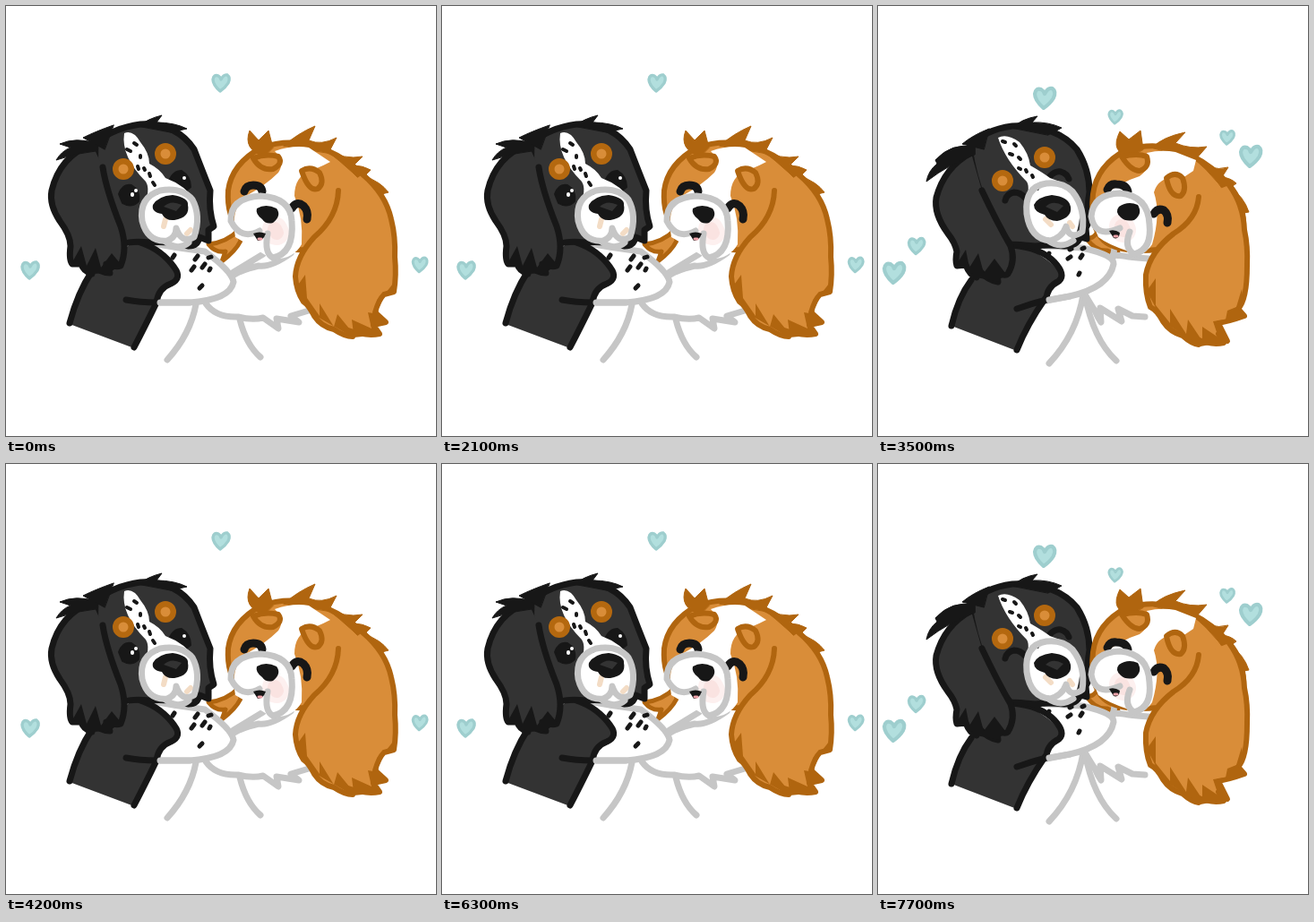
Recreate the animation shown at these times as an HTML page. Size 480x480 px, loop 8.4 s.

```html
<!DOCTYPE html>
<html lang="en">
<head>
<meta charset="utf-8">
<title>Cuddling spaniels</title>
<style>
html, body { margin: 0; width: 100%; height: 100%; overflow: hidden; background: #fff; }
svg { display: block; width: 100vw; height: 100vh; }
path { stroke-linecap: round; stroke-linejoin: round; }
</style>
</head>
<body>
<svg id="stage" viewBox="0 0 480 480"></svg>
<script>
const INK = '#171717', COAT = '#333', GREY = '#c6c6c6', GOLD = '#d98d39', RUST = '#b0650f', WHITE = '#fff', NONE = 'none';
const STEP = 700;

// Each part: fill, stroke, width, leaning-out path, hugging path, and optionally which poses use it.
const parts = [
  // far ear, legs and chest
  [GOLD, RUST, 5, 'M226 266Q246 264 260 250L262 262Q256 274 241 285L245 274Q234 276 226 266Z',
    'M232 258Q240 262 246 250L266 262Q268 274 268 279L256 273Q242 274 232 258Z'],
  [NONE, GREY, 7, 'M212 333Q206 366 180 395', 'M229 322Q222 366 191 399'],
  [NONE, GREY, 7, 'M261 350Q268 378 284 392', 'M231 322Q240 372 266 396'],
  [NONE, GREY, 7, 'M223 332Q234 348 259 347Q275 351 287 348L304 360L302 349L327 353L318 346L338 340',
    'M231 322Q238 334 242 340Q245 347 249 353L248 337L272 352L268 338L284 346L298 347'],

  // black dog: arm and body
  [WHITE, GREY, 7, 'M158 264Q190 270 222 274Q252 296 254 308Q250 328 205 331L172 331',
    'M152 266Q190 268 228 270Q264 278 263 288Q258 314 214 324L188 329'],
  [NONE, GREY, 7, 'M318 276Q296 292 282 290Q258 296 252 302M287 277L254 297',
    'M302 282Q288 281 280 280Q268 278 262 278M264 270L262 282'],
  [COAT, NONE, 0, 'M96 296Q82 316 71 355L143 382Q154 362 167 335L172 318Q190 312 193 302Q184 280 150 258Z',
    'M104 306Q90 326 82 357L155 385Q166 364 181 336L190 320Q206 308 203 298Q190 278 146 262Z'],
  [NONE, INK, 7, 'M96 296Q80 320 71 354M143 381Q160 348 168 331',
    'M104 306Q89 326 82 357M155 384Q166 356 187 326'],
  [NONE, INK, 7, 'M150 264Q174 272 188 292Q197 304 184 310Q170 315 168 331Q150 331 134 328',
    'M150 267Q182 270 197 286Q210 300 202 307Q188 314 188 328Q172 332 155 338'],
  [NONE, GREY, 7, 'M172 331L205 331', 'M191 328L214 324'],
  [NONE, INK, 5, 'M186 281l2-3M211 283l3-4M226 281l3-1M207 295l3-4M219 292l3-4M227 295l1-2M216 315l3-3',
    'M190 279l1-3M212 282l3-2M214 272l2-1M205 262l2-1M226 281l2-3M228 271l2-1M224 300l1-2'],

  // black dog: head
  [COAT, INK, 7, 'M100 153Q120 136 150 132Q190 130 210 160Q220 186 228 206Q226 228 232 246L226 250L226 262L216 258Q214 268 204 268Q180 262 160 264Q140 262 130 266Q96 222 100 153Z',
    'M102 158Q118 138 150 134Q198 132 222 160Q236 182 236 208Q233 224 235 242L232 248L233 260L226 258Q222 268 208 268Q190 266 176 268Q156 266 148 266Q112 226 102 158Z'],
  [COAT, INK, 7, 'M96 154Q60 168 51 206Q48 222 60 240Q72 256 72 268Q70 284 74 288L84 288Q86 296 96 299L98 290Q106 298 116 298L112 288Q122 292 128 290Q136 270 128 246Q112 206 108 180',
    'M104 164Q74 180 65 214Q62 232 78 254Q86 264 88 274Q86 284 88 290L98 289Q102 300 110 303L113 295Q122 306 134 308L133 298Q142 302 145 299Q154 284 148 268Q132 240 116 206'],
  [INK, NONE, 0, 'M74 286L84 268L90 290L100 270L106 292L118 276L128 288L116 298L96 299L84 290Z',
    'M88 288L98 272L102 292L112 276L118 298L130 282L142 298L134 308L110 303L98 293Z'],
  [INK, INK, 1, 'M110 160L86 147Q100 140 120 133ZM100 162Q78 164 56 172Q62 162 72 158L60 154Q78 146 100 153ZM148 134Q158 126 174 122L168 130Q188 130 202 137L184 141Z',
    'M118 160L94 154Q106 144 124 137ZM108 166Q80 176 54 196Q56 184 66 176L64 172Q82 152 108 157ZM150 136Q160 126 178 123L172 130Q190 129 205 136L190 144Z'],
  [INK, INK, 2, 'M126 210Q130 198 140 200Q150 206 148 218Q140 226 130 220ZM182 196Q186 184 196 184Q206 190 206 202Q198 210 188 206Z', '', 'out'],
  [NONE, WHITE, 4, 'M141 210l0 1M199 192l0 0M145 206l0 0', '', 'out'],
  [NONE, INK, 7, 'M132 214Q134 206 144 206Q150 207 156 212M184 195Q190 187 200 189Q206 192 208 197',
    'M142 217Q144 209 152 208Q159 208 164 214M192 190Q198 184 204 185Q211 187 213 193', 'hug'],
  [WHITE, NONE, 0, 'M132 142Q142 138 150 152Q160 164 160 176Q172 182 178 192Q200 200 212 218Q220 240 206 262Q182 272 162 258Q148 240 153 222Q162 206 156 196Q128 168 132 142Z',
    'M134 147Q144 142 158 152Q168 164 170 178Q184 186 192 192Q212 198 222 212Q230 236 218 262Q196 270 178 260Q164 244 165 220Q170 202 166 196Q142 172 134 147Z'],
  [NONE, INK, 4, 'M135 160l4 2M143 153l3 2M150 167l0 2M147 179l1 3M154 181l1 2M160 187l1 3M164 197l2 3M167 208l1 1',
    'M139 151l3 1M152 154l2 2M147 165l3 1M157 169l2 2M157 181l2 1M165 183l1 2M172 189l1 2M177 203l1 1'],
  [NONE, '#b4680f', 24, 'M131 182l0 0M178 165l0 0', 'M139 195l0 0M186 169l0 0'],
  [NONE, GOLD, 11, 'M131 182l0 0M178 165l0 0', 'M139 195l0 0M186 169l0 0'],
  [NONE, '#f3dcc5', 6, 'M178 238l-2 8M206 250l-4 4', 'M187 238l6 6M217 246l-3-4'],
  [WHITE, GREY, 7, 'M178 263Q192 274 204 264', 'M190 262Q204 272 218 262'],
  [NONE, GREY, 7, 'M172 206Q148 214 152 240Q158 264 180 262Q190 258 190 248Q196 266 210 258Q218 234 208 216Q196 202 172 206',
    'M188 198Q163 202 166 232Q170 260 192 262Q206 258 210 246Q214 262 228 252Q232 226 217 207Q206 196 188 198'],
  [INK, NONE, 0, 'M164 222Q170 212 186 211Q204 214 203 222Q206 236 188 239Q178 240 174 232Q162 230 164 222Z',
    'M174 222Q178 213 194 211Q213 213 215 224Q217 236 200 240Q190 240 186 233Q174 230 174 222Z'],
  [COAT, NONE, 0, 'M176 224Q184 216 196 222L190 229Z', 'M187 224Q195 216 207 223L200 230Z'],

  // tan dog: head
  [GOLD, RUST, 6, 'M285 158Q320 146 356 160Q384 172 402 192Q424 210 426 240Q404 262 334 272Q296 274 262 250Q246 236 248 206Q252 176 285 158Z',
    'M278 160Q316 150 348 166Q376 180 392 200Q408 218 408 244Q388 262 312 272Q268 276 252 262Q236 246 240 210Q244 178 278 160Z'],
  [RUST, RUST, 1, 'M288 168Q264 160 272 139L282 150L293 139L298 158ZM310 156Q326 142 345 134L338 150Q352 156 369 147L360 164ZM356 160Q378 172 398 168L388 178Q398 178 407 183L400 190Q418 196 427 208L412 212Q390 186 356 160Z',
    'M282 168Q258 164 270 140L280 149L293 139L296 160ZM306 158Q318 146 343 141L332 153Q348 160 367 157L354 172ZM350 168Q370 186 391 180L384 191Q394 192 400 198L393 203Q408 212 414 230L402 232Q384 196 350 168Z'],
  [WHITE, NONE, 0, 'M300 162Q320 155 338 158L362 174L354 178L340 184Q322 190 322 212Q332 236 330 266Q320 284 296 282Q270 266 256 258Q250 226 268 212Q290 200 304 186Q312 174 300 162Z',
    'M300 164Q316 160 332 163L355 172L352 184L340 192Q314 188 308 208Q316 232 306 266Q298 280 280 274Q256 266 246 258Q234 232 248 214Q272 196 292 190Q308 178 300 164Z'],
  [GOLD, RUST, 6, 'M276 170Q290 164 304 168Q310 176 298 182Q284 184 276 170ZM330 184Q340 178 350 186Q356 198 348 204Q338 208 330 184Z',
    'M272 168Q290 164 300 168Q304 180 292 184Q282 184 272 168ZM322 192Q332 184 340 192Q345 206 338 212Q326 214 322 192Z'],
  [NONE, INK, 9, 'M266 207Q268 200 276 200Q285 200 286 207M319 226Q324 217 332 223Q338 229 336 238',
    'M256 205Q259 198 266 199Q277 199 279 207M308 232Q312 225 319 228Q325 233 323 242'],
  [NONE, '#fdf0ef', 28, 'M300 249l2 4', 'M272 246l2 4'],
  [NONE, '#fae3e1', 16, 'M300 249l2 4', 'M272 246l2 4'],
  [NONE, GREY, 7, 'M283 251Q262 262 251 240Q250 214 284 212Q318 214 319 240Q322 276 298 281Q288 276 292 254',
    'M270 248Q242 260 238 235Q240 210 270 209Q302 212 303 244Q306 272 286 277Q274 270 281 252'],
  [INK, NONE, 0, 'M276 254Q283 251 290 254Q287 262 281 262Z', 'M258 251Q264 249 270 253Q269 261 263 259Z'],
  [NONE, '#efa3aa', 3, 'M282 260l3 0', 'M264 257l3 0'],
  [INK, NONE, 0, 'M280 226Q290 220 302 226Q308 234 298 242Q290 244 286 238Q278 232 280 226Z',
    'M269 224Q279 217 290 222Q296 232 286 239Q276 241 271 236Q264 230 269 224Z'],

  // tan dog: near ear with darker locks
  [GOLD, RUST, 6, 'M371 206Q370 236 344 258Q324 280 323 302Q324 318 332 330Q338 334 344 346Q352 358 366 361Q378 369 387 369L382 362Q402 369 417 366L410 356L424 353L412 342Q416 328 422 322L433 319Q436 300 434 280Q435 258 430 238Q424 210 398 188',
    'M358 213Q356 238 330 254Q304 274 299 300Q298 322 304 336Q312 340 318 352Q326 364 340 368Q350 377 358 378L356 372Q372 379 386 376L380 366L390 374L380 354Q392 352 409 346L402 338Q412 328 412 290Q413 268 409 250Q408 222 392 200'],
  [RUST, NONE, 0, 'M324 314L334 300L336 326L350 346L350 332L366 358L370 344L388 366L386 350L408 360L404 342L416 344L414 328L424 320L432 310L434 320L422 324L414 342L424 354L420 355L412 356L418 367L388 370L346 346Z',
    'M300 318L310 304L310 334L326 354L326 338L344 366L346 350L362 374L362 358L380 370L374 352L388 350L390 340L400 336L406 316L408 330L402 338L406 342L411 347L396 350L382 354L392 374L360 380L318 352Z']
];

// lean: 0 = apart, 1 = hugging; hearts are x, y, scale
const poses = [
  { lean: 0, hearts: [[240, 86, 1], [27, 295, 1], [462, 289, .87]] },
  { lean: .5, hearts: [[216, 103, 1.05], [30, 292, 1.05], [430, 232, 1.05]] },
  { lean: 1, hearts: [[186, 103, 1.22], [265, 124, .8], [390, 147, .82], [416, 168, 1.22], [43, 268, .95], [18, 298, 1.22]] }
];

function mix(a, b, t) {
  const end = b.match(/-?[\d.]+/g) || [];
  let i = 0;
  return a.replace(/-?[\d.]+/g, n => ' ' + (+n + ((end[i++] ?? n) - n) * t));
}

function add(tag, attrs, parent) {
  const el = document.createElementNS('http://www.w3.org/2000/svg', tag);
  for (const k in attrs) el.setAttribute(k, attrs[k]);
  return parent.appendChild(el);
}

function drawPose({ lean, hearts }) {
  const g = add('g', { visibility: 'hidden' }, stage);
  for (const [fill, stroke, width, a, b, when] of parts) {
    if (when === 'out' && lean > 0 || when === 'hug' && lean === 0) continue;
    add('path', { d: mix(a, b, lean), fill, stroke, 'stroke-width': width }, g);
  }
  for (const [x, y, s] of hearts) {
    add('path', {
      d: 'M-1 9Q-9 2-9-4Q-8-10-3-8Q-1-7 0-4Q3-10 7-9Q11-6 8 0Q5 5-1 9Z',
      transform: `translate(${x} ${y}) scale(${s})`,
      fill: '#b2dfde', stroke: '#9ecece', 'stroke-width': 3.4
    }, g);
  }
  return g;
}

const stage = document.getElementById('stage');
const groups = poses.map(drawPose);
const start = performance.now();

function show() {
  const now = Math.floor((performance.now() - start) / STEP) % groups.length;
  groups.forEach((g, i) => g.setAttribute('visibility', i === now ? 'visible' : 'hidden'));
  requestAnimationFrame(show);
}
show();
</script>
</body>
</html>
```
